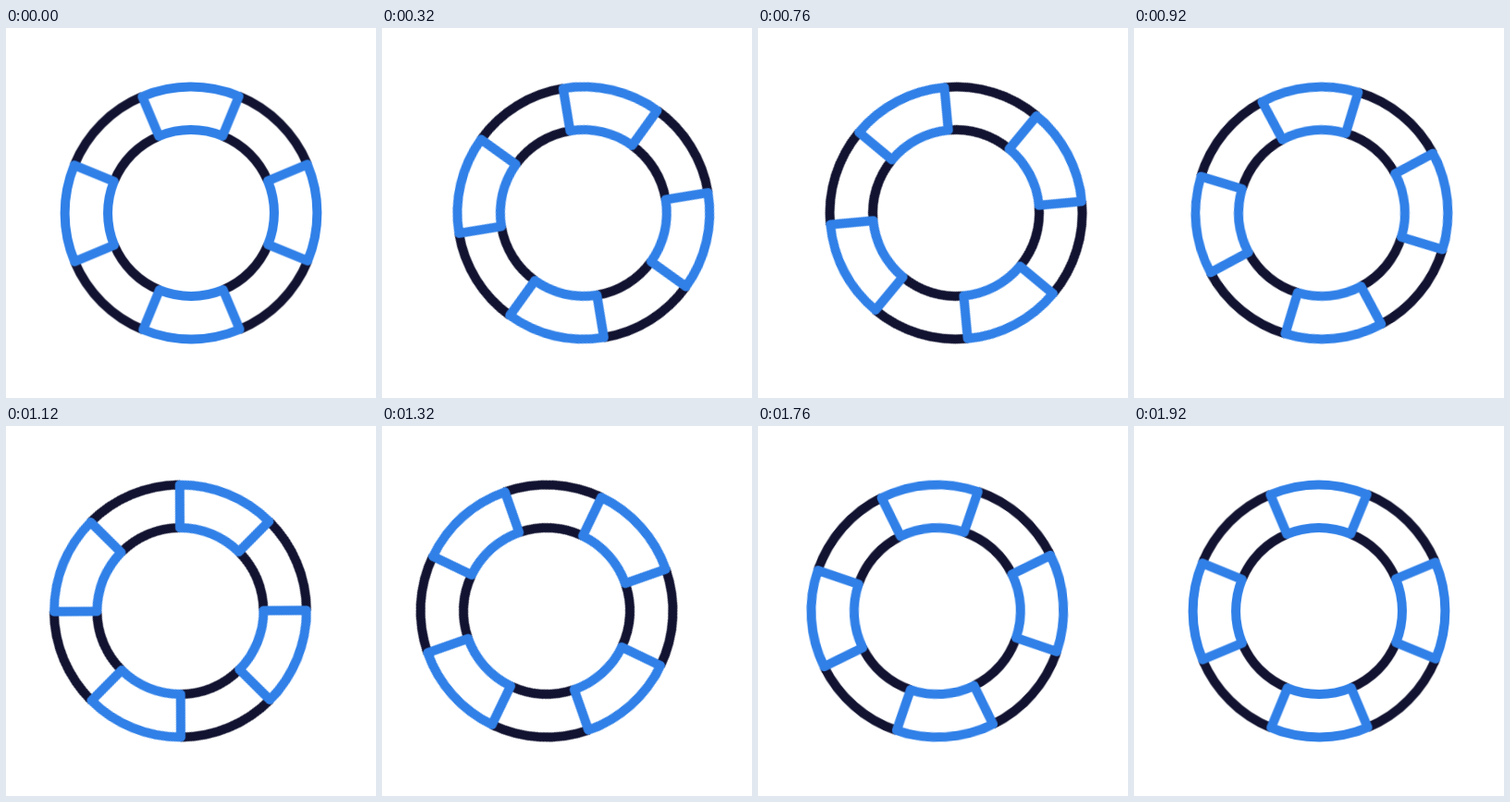
An HTML page that plays this animation: 400x400 px, repeating every 2 s.

```html
<!DOCTYPE html>
<html lang="en">
<head>
<meta charset="utf-8">
<title>Rolling lifebuoy</title>
<style>
  html, body { margin: 0; width: 100%; height: 100%; overflow: hidden; background: #fff; }
  svg { display: block; width: 100vw; height: 100vh; }
  .sway, .spin {
    transform-origin: 0 0;
    animation: sway 2s infinite;
    /* smoothstep: each pose eases in and out */
    animation-timing-function: cubic-bezier(.3333, 0, .6667, 1);
  }
  .spin { animation-name: spin; }
  @keyframes sway {
    0%, 96%, 100% { transform: translateX(0); }
    24% { transform: translateX(24px); }
    72% { transform: translateX(-24px); }
  }
  @keyframes spin {
    0% { transform: rotate(-.2deg); }
    96%, 100% { transform: rotate(179.8deg); }
  }
  .ring, .band { fill: none; stroke-width: 10; }
  .ring { stroke: #121331; stroke-dasharray: 2 2; stroke-dashoffset: -1; }
  .band { stroke: #3080e8; stroke-linejoin: round; }
</style>
</head>
<body>
<svg viewBox="-200 -200 400 400">
  <defs>
    <path id="band" d="M-52.2-126A136.4 136.4 0 0 1 52.2-126L34.4-83.1A90 90 0 0 0-34.4-83.1Z"/>
  </defs>
  <g class="sway">
    <g class="spin">
      <g class="ring">
        <circle r="136.4" pathLength="16"/>
        <circle r="90" pathLength="16"/>
      </g>
      <g class="band">
        <use href="#band"/>
        <use href="#band" transform="rotate(90)"/>
        <use href="#band" transform="rotate(180)"/>
        <use href="#band" transform="rotate(270)"/>
      </g>
    </g>
  </g>
</svg>
</body>
</html>
```
